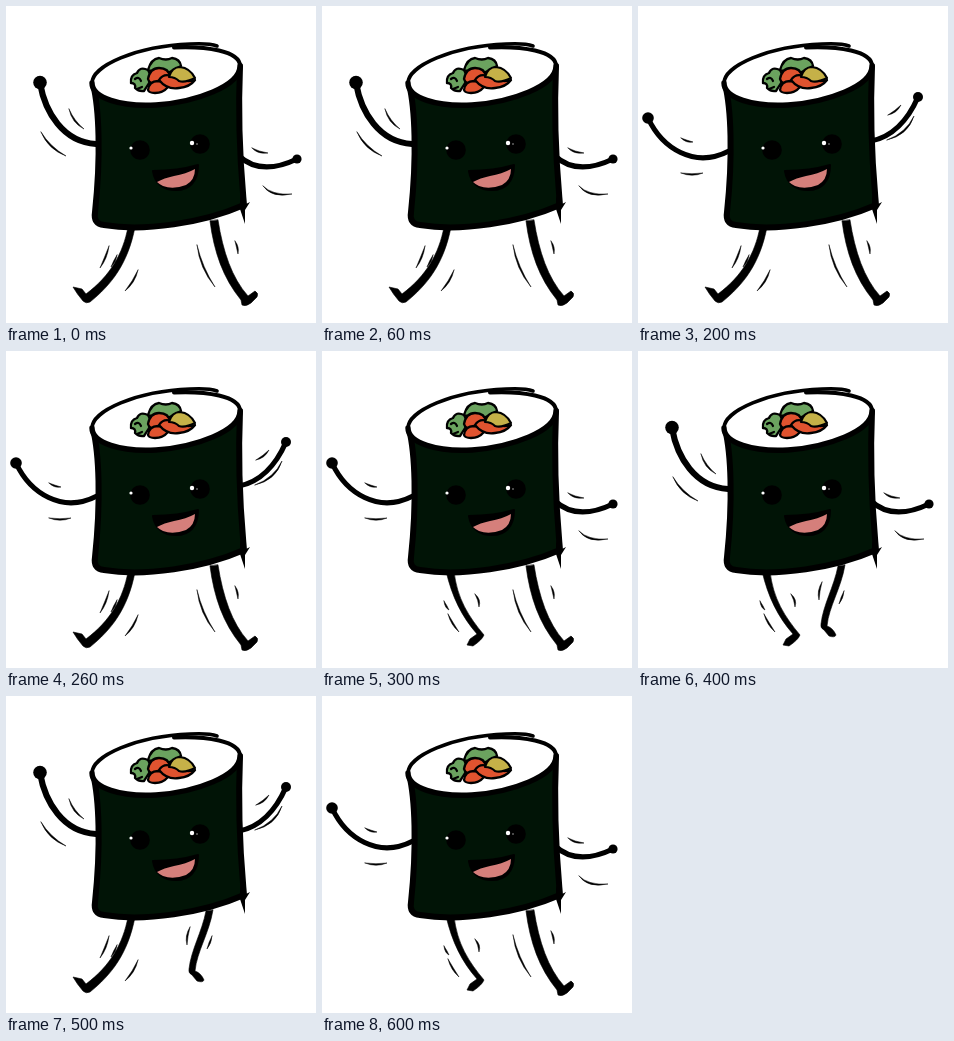
Recreate the animation shown at these times as an HTML page with a canvas. Size 310 px wide and 317 px high, loop 0.7 s.

```html
<!DOCTYPE html>
<html lang="en">
<head>
<meta charset="utf-8">
<title>Dancing roll</title>
<style>
html, body { margin: 0; width: 100%; height: 100%; overflow: hidden; background: #fff; }
canvas { display: block; width: 310px; height: 317px; }
</style>
</head>
<body>
<canvas id="stage"></canvas>
<script>
const canvas = document.getElementById('stage');
const ctx = canvas.getContext('2d');
const ratio = window.devicePixelRatio || 1;
canvas.width = 310 * ratio;
canvas.height = 317 * ratio;
ctx.scale(ratio, ratio);
ctx.lineCap = ctx.lineJoin = 'round';

const INK = '#000', NORI = '#011406';
const GREEN = '#6ba35f', ORANGE = '#e0532f', YELLOW = '#c5b148', PINK = '#d57f7b';
const STEP = 100;

function line(d, width) {
  ctx.strokeStyle = INK;
  ctx.lineWidth = width;
  ctx.stroke(new Path2D(d));
}

function fill(d, color) {
  ctx.fillStyle = color;
  ctx.fill(new Path2D(d));
}

function shape(d, color, width) {
  fill(d, color);
  line(d, width);
}

function dot(x, y, r, color = INK) {
  ctx.fillStyle = color;
  ctx.beginPath();
  ctx.arc(x, y, r, 0, Math.PI * 2);
  ctx.fill();
}

// Curved stroke that tapers to a point at both ends
function swish([x0, y0, cx, cy, x1, y1], width = 1.6) {
  const len = Math.hypot(x1 - x0, y1 - y0);
  const nx = (y0 - y1) / len * width, ny = (x1 - x0) / len * width;
  shape(`M${x0} ${y0}Q${cx + nx} ${cy + ny} ${x1} ${y1}Q${cx - nx} ${cy - ny} ${x0} ${y0}Z`, INK, 0.5);
}

// Each limb has two poses: [raised or spread, lowered or tucked]
const leftArm = [
  { d: 'M34 77C39 106 57 136 90 138', width: 6.2, hand: [34, 76.5, 6.8],
    marks: [[63, 103, 67, 116, 78, 123], [35, 126, 43, 142, 60, 150]] },
  { d: 'M10 112C24 142 56 163 91 145', width: 5.2, hand: [10, 112, 5.8],
    marks: [[43, 132, 49, 136, 55, 136], [43, 167, 54, 170, 65, 167]] }
];
const rightArm = [
  { d: 'M233 135C254 131 270 114 280 91', width: 5.2, hand: [280, 91, 5],
    marks: [[250, 109, 258, 106, 263, 99], [249, 134, 269, 128, 276, 110]] },
  { d: 'M233 150C248 164 268 164 291 153', width: 5.2, hand: [291, 153, 4.6],
    marks: [[246, 142, 252, 147, 262, 147], [257, 180, 266, 191, 286, 188]] }
];
const leftLeg = [
  { d: 'M122 221C117 248 104 270 80 288L76 283L67 281Q71 288 77 295Q80 298 84 296C105 279 122 258 129 221Z',
    marks: [[103, 240, 100, 252, 94, 262], [111, 249, 109, 255, 105, 261], [132, 264, 128, 276, 119, 285]] },
  { d: 'M124 220C130 246 140 266 155 283L148 288L145 294L151 295Q160 289 162 284C147 266 135 248 132 220Z',
    marks: [[122, 250, 124, 256, 127, 259], [126, 263, 130, 273, 137, 281], [153, 243, 158, 249, 157, 256]] }
];
const rightLeg = [
  { d: 'M204 215C208 246 217 272 235 294L236 299Q240 301 245 297L251 291Q253 287 249 285L242 290C226 272 217 246 212 214Z',
    marks: [[191, 239, 195, 262, 209, 281], [229, 235, 232, 241, 232, 248]] },
  { d: 'M200 215C196 236 185 254 183 273Q182 277 186 279L191 285Q197 287 198 284Q195 277 189 275C191 255 203 238 207 214Z',
    marks: [[184, 231, 180, 240, 181, 249], [206, 240, 204, 247, 201, 253]] }
];

function drawArm(arm) {
  line(arm.d, arm.width);
  dot(...arm.hand);
  arm.marks.forEach(m => swish(m));
}

function drawLeg(leg) {
  shape(leg.d, INK, 0.6);
  leg.marks.forEach(m => swish(m));
}

function drawFilling() {
  shape('M125 77Q124 69 131 67Q134 60 142 64L146 72Q142 79 138 85Q133 86 129 82Q130 77 125 77Z', GREEN, 2.3);
  shape('M142 64Q145 53 153 52Q160 55 166 52Q174 53 175 60L160 68Z', GREEN, 2.3);
  line('M129 73Q133 70 135 75M131 83L136 81', 2.2);
  shape('M142 73Q144 62 153 62Q163 62 164 71L154 80Q143 78 142 73Z', ORANGE, 2.3);
  shape('M142 84Q143 75 152 75Q163 76 162 81Q157 87 149 87Q143 87 142 84Z', ORANGE, 2.3);
  shape('M153 74Q158 66 168 71Q180 77 189 74Q184 81 173 82Q161 84 153 74Z', ORANGE, 2.3);
  shape('M163 71Q166 61 174 61Q184 62 189 72Q179 77 173 75Q169 71 163 71Z', YELLOW, 2.2);
}

function drawFace() {
  dot(134, 144, 9.8);
  dot(194, 138, 9.8);
  dot(186, 137, 2.2, '#fff');
  dot(191, 138, 0.7, '#ccc');
  dot(125, 142, 1.6, '#fff');
  shape('M147 165Q172 165 192 159C192 175 184 184 170 184C158 184 149 178 147 165Z', INK, 2);
  fill('M151 176Q158 172 168 170Q180 168 189 163Q189 174 180 179Q167 184 157 180Q153 178 151 176Z', PINK);
}

function drawBody() {
  shape('M87 78C93 102 95 150 89 206Q87 218 98 219C138 226 197 217 238 199C236 175 231 130 234 60Z', NORI, 6);
  fill('M234 190L238 199L244 196L239 204L239 218L234 203Z', INK);
  fill('M86 77C86 60 130 40 184 39C215 39 234 48 234 60C234 80 190 96 150 99C115 101 86 92 86 77Z', '#fff');
  line('M234 60C234 80 190 96 150 99C115 101 86 92 86 77', 5.4);
  line('M86 77C86 60 130 40 184 38Q203 37 211 40', 3.6);
  line('M168 41.5C200 40 234 45 234 60', 4);
  drawFilling();
  drawFace();
}

// Pose of left arm, right arm, left leg, right leg at every step
const dance = ['0100', '0000', '1000', '1110', '0111', '0001', '1110'];

function draw(now) {
  const beat = dance[Math.floor(now / STEP) % dance.length];
  ctx.fillStyle = '#fff';
  ctx.fillRect(0, 0, 310, 317);
  drawLeg(leftLeg[beat[2]]);
  drawLeg(rightLeg[beat[3]]);
  drawArm(leftArm[beat[0]]);
  drawArm(rightArm[beat[1]]);
  drawBody();
}

let start;
function tick(now) {
  start ??= now;
  draw(Math.max(0, now - start));
  requestAnimationFrame(tick);
}
draw(0);
requestAnimationFrame(tick);
</script>
</body>
</html>
```
